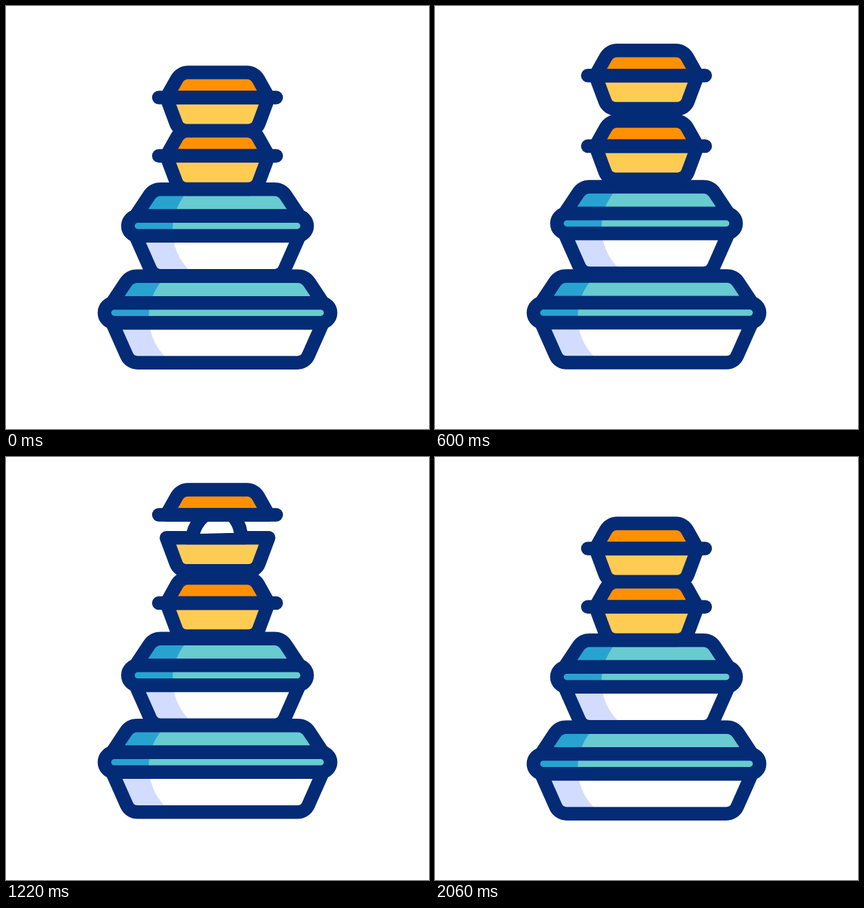
An HTML page with a canvas for the animation above (2400 ms loop, 640 by 640 pixels).

```html
<!DOCTYPE html>
<html lang="en">
<head>
<meta charset="utf-8">
<title>Food containers</title>
<style>
html, body { margin: 0; width: 100%; height: 100%; overflow: hidden; background: #fff; }
canvas { display: block; width: 100%; height: 100%; }
</style>
</head>
<body>
<canvas id="stage" width="640" height="640"></canvas>
<script>
const ctx = document.getElementById('stage').getContext('2d');
const LOOP = 2400, LAG = 73, LINE = 20.5;
const NAVY = '#042b76', ORANGE = '#ff9100', YELLOW = '#ffcc53';
const TEAL = '#67cbd0', BLUE = '#28a3d0', LILAC = '#d2dcfe', WHITE = '#fff';

// start, duration, height of each hop
const HOPS = [[0, 610, 21.6], [590, 565, 18.5], [1125, 570, 9]];
const LID_HOPS = [[875, 530, 44], [1420, 640, 9]];

const clamp = v => Math.max(0, Math.min(1, v));

function lift(hops, t) {
  return hops.reduce((sum, [start, span, height]) =>
    sum + height * Math.sin(Math.PI * clamp((t - start) / span)) ** 2, 0);
}

// Symmetric tub outline around x = 320: open end at y0, rounded end at y1
function tub(x0, y0, x1, y1, r) {
  const p = new Path2D();
  p.moveTo(x0, y0);
  p.arcTo(x1, y1, 320, y1, r);
  p.arcTo(640 - x1, y1, 640 - x0, y0, r);
  p.lineTo(640 - x0, y0);
  p.closePath();
  return p;
}

function ink(p) {
  ctx.strokeStyle = NAVY;
  ctx.lineWidth = LINE;
  ctx.stroke(p);
}

function at(dy, draw) {
  ctx.save();
  ctx.translate(0, dy);
  draw();
  ctx.restore();
}

// Filled shape whose left part, outside a big circle, is shaded
function shaded(p, dark, light, shadeX) {
  ctx.save();
  ctx.clip(p);
  ctx.fillStyle = dark;
  ctx.fillRect(0, 0, 640, 640);
  ctx.fillStyle = light;
  ctx.beginPath();
  ctx.arc(shadeX, 339, 86, Math.PI / 2, Math.PI * 1.5);
  ctx.lineTo(640, 253);
  ctx.lineTo(640, 425);
  ctx.fill();
  ctx.restore();
  ink(p);
}

function dish(dy, wide, shadeX) {
  at(dy, () => {
    shaded(tub(196 - wide, 347.75, 222.8 - wide, 408.25, 18), LILAC, WHITE, shadeX);
    shaded(tub(196 - wide, 317.75, 222.9 - wide, 277.25, 21), BLUE, TEAL, shadeX);
    const band = new Path2D();
    band.roundRect(184.4 - wide, 317.75, 271.2 + 2 * wide, 30, 15);
    shaded(band, BLUE, TEAL, shadeX);
  });
}

const boxBase = tub(242.7, 138.5, 261.4, 188.7, 17);
const boxLid = tub(242.7, 138.5, 264, 100.5, 20);
const boxBar = new Path2D('M231.2 138.5H408.8');
const food = new Path2D('M281 143C283 119 300 97 322 97C343 97 356 117 356 141Z');

function box(dy, open) {
  at(dy, () => {
    ctx.fillStyle = YELLOW;
    ctx.fill(boxBase);
    ink(boxBase);
    if (open > 20) {
      ctx.beginPath();
      ctx.rect(0, 0, 640, 148.7);
      ctx.clip();
      ctx.fillStyle = WHITE;
      ctx.fill(food);
      ink(food);
    }
  });
  at(dy - open, () => {
    ctx.fillStyle = ORANGE;
    ctx.fill(boxLid);
    ink(boxLid);
    ink(boxBar);
  });
}

function rays(t) {
  const ease = v => (1 - Math.cos(Math.PI * clamp(v))) / 2;
  const head = ease((t - 780) / 200), tail = ease((t - 890) / 230);
  if (head - tail < 0.005) return;
  ctx.strokeStyle = YELLOW;
  ctx.lineWidth = LINE;
  for (const [deg, end] of [[-83, 123], [-37.5, 119], [2, 127]]) {
    const a = deg * Math.PI / 180;
    const c = Math.cos(a), s = Math.sin(a);
    const from = end - 50 * (1 - tail), to = end - 50 * (1 - head);
    ctx.beginPath();
    ctx.moveTo(460 + c * from, 308 + s * from);
    ctx.lineTo(460 + c * to, 308 + s * to);
    ctx.stroke();
  }
}

function render(t) {
  ctx.fillStyle = WHITE;
  ctx.fillRect(0, 0, 640, 640);
  ctx.lineCap = ctx.lineJoin = 'round';
  // each piece rides on the one below and hops a little later
  const up = [];
  let sum = 0;
  for (let i = 0; i < 4; i++) up.push(sum += lift(HOPS, t - i * LAG));
  rays(t);
  dish(131.4 - up[0], 35.5, 302);
  dish(-up[1], 0, 338);
  box(88.3 - up[2], 0);
  box(-up[3], lift(LID_HOPS, t));
}

const begin = performance.now();
function tick() {
  render((performance.now() - begin) % LOOP);
  requestAnimationFrame(tick);
}
tick();
</script>
</body>
</html>
```
